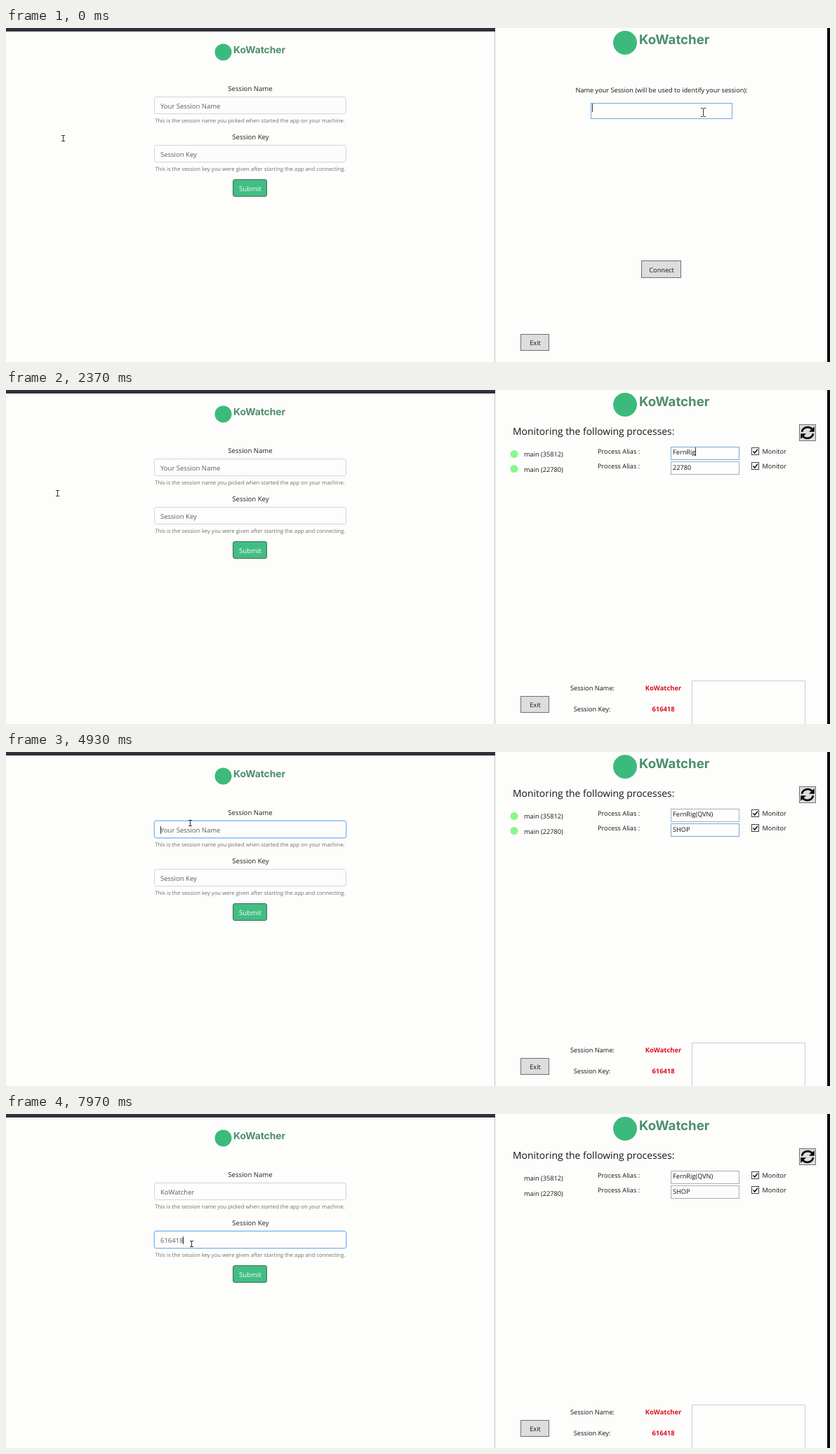
Recreate the animation shown at these times as an HTML page. Size 1174 by 477 pixels, loop 8000 ms.

```html
<!DOCTYPE html>
<html lang="en">
<head>
<meta charset="utf-8">
<title>Process monitor</title>
<style>
  html, body { margin: 0; width: 100%; height: 100%; overflow: hidden; background: #fdfdfb; }
  svg { display: block; width: 1174px; height: 477px; }
  text { font-family: "Open Sans", "Noto Sans", sans-serif; fill: #141414; white-space: pre; text-rendering: geometricPrecision; }
  .mid { text-anchor: middle; }
  .web text { font-size: 9.6px; fill: #222; }
  .web .hint { font-size: 7.7px; fill: #6c7268; }
  .web .value { font-size: 9.5px; fill: #5c5c5c; }
  .app text { font-size: 9.2px; }
  .app .title { font-size: 13.9px; }
  .app .red { font-size: 9.4px; font-weight: 700; fill: #dc1020; }
  .brand text { font-family: Inter, "Open Sans", sans-serif; font-weight: 700; fill: #4c8e6c; }
  .brand circle { fill: #3cba7c; }
  .field { fill: #fdfdfb; stroke: #d2d3e0; }
  .box { fill: #fdfdfb; stroke: #abadb3; }
  .button { fill: #ddd; stroke: #707070; }
  .ring { fill: none; stroke: #c4defb; stroke-width: 2; }
  .focus.field { stroke: #84baf5; }
  .focus.box { stroke: #74a9e0; }
  .hover { fill: #bee6fd; stroke: #3c7fb1; }
  .caret { stroke: #333; stroke-width: 1; }
  .beam { fill: none; stroke: #333; stroke-width: 1; }
</style>
</head>
<body>
<svg viewBox="0 0 1174 477">
  <rect width="1174" height="477" fill="#fdfdfb"/>
  <rect width="697" height="5" fill="#33303a"/>
  <rect x="696" y="5" width="1" height="472" fill="#c2c2ca"/>
  <rect x="1170" width="4" height="477" fill="#0b0b0d"/>

  <g class="brand">
    <circle cx="309.5" cy="34.5" r="12"/>
    <text x="324" y="35.5" font-size="13.8">KoWatcher</text>
    <circle cx="882" cy="21" r="17"/>
    <text x="902" y="22.5" font-size="18.7">KoWatcher</text>
  </g>

  <g class="web">
    <text class="mid" x="348" y="89.5">Session Name</text>
    <rect id="nameRing" class="ring" x="211" y="98" width="274" height="25" rx="3.5"/>
    <rect id="nameBox" class="field" x="211.5" y="98.5" width="273" height="24" rx="3"/>
    <text id="name" class="value" x="220" y="114.5"></text>
    <text class="hint mid" x="347.5" y="134.5">This is the session name you picked when started the app on your machine.</text>
    <text class="mid" x="348.5" y="159">Session Key</text>
    <rect id="keyRing" class="ring" x="211" y="167" width="274" height="25" rx="3.5"/>
    <rect id="keyBox" class="field" x="211.5" y="167.5" width="273" height="24" rx="3"/>
    <text id="key" class="value" x="220" y="183.5"></text>
    <text class="hint mid" x="348" y="203.8">This is the session key you were given after starting the app and connecting.</text>
    <rect x="323.5" y="216.5" width="48" height="24" rx="2.5" fill="#43bd83" stroke="#3f6e58"/>
    <text class="mid" x="348" y="232.5" style="fill:#f4fff8">Submit</text>
  </g>

  <g class="app">
    <rect class="button" x="733.5" y="437.5" width="40" height="23"/>
    <text class="mid" x="754" y="452.5">Exit</text>

    <g id="login">
      <text class="mid" x="934" y="91.5">Name your Session (will be used to identify your session):</text>
      <rect class="box focus" x="833.5" y="107.5" width="201" height="22"/>
      <text id="session" x="835.5" y="117.5"></text>
      <rect id="connect" class="button" x="905.5" y="332.5" width="56" height="24"/>
      <text class="mid" x="934" y="348.5">Connect</text>
    </g>

    <g id="monitor">
      <text class="title" x="722" y="64">Monitoring the following processes:</text>
      <rect class="button" x="1130.5" y="49.5" width="23" height="23"/>
      <g fill="none" stroke="#0c0c0c" stroke-width="2.8">
        <path d="M1134 59.8A8.4 8 0 0 1 1148.8 56.2M1150 62.2A8.4 8 0 0 1 1135.2 65.8"/>
        <path fill="#0c0c0c" stroke="none" d="M1151.8 52V59.8H1144ZM1132.2 70V62.2H1140Z"/>
      </g>
      <g id="dots" fill="#8df58b"><circle cx="724" cy="91.5" r="5.5"/><circle cx="724" cy="112.5" r="5.5"/></g>
      <text x="738" y="95.3">main (35812)</text>
      <text x="738" y="116.5">main (22780)</text>
      <text x="843" y="91.2">Process Alias :</text>
      <text x="843" y="112.2">Process Alias :</text>
      <rect id="firstBox" class="box" x="947.5" y="81.5" width="97" height="18"/>
      <rect id="secondBox" class="box" x="947.5" y="102.5" width="97" height="18"/>
      <text id="first" x="950" y="92.3"></text>
      <text id="second" x="950" y="113.5"></text>
      <g fill="#fff" stroke="#444">
        <rect x="1062.5" y="82.5" width="10" height="10"/>
        <rect x="1062.5" y="103.5" width="10" height="10"/>
        <path d="M1064.5 87.5l2.3 2.5 4-5.2M1064.5 108.5l2.3 2.5 4-5.2" fill="none" stroke="#111" stroke-width="1.5"/>
      </g>
      <text x="1077.5" y="91">Monitor</text>
      <text x="1077.5" y="112">Monitor</text>
      <text class="mid" x="835.5" y="429">Session Name:</text>
      <text class="mid" x="835" y="459">Session Key:</text>
      <text class="mid red" x="936.5" y="429">KoWatcher</text>
      <text class="mid red" x="936.5" y="459">616418</text>
      <rect x="977.5" y="415.5" width="161" height="70" fill="none" stroke="#cccdda"/>
    </g>
  </g>

  <line id="webCaret" class="caret"/>
  <line id="appCaret" class="caret"/>
  <g id="webMouse">
    <path class="beam" d="M-2.5 -4H2.5M-2.5 4H2.5M0 -4V4"/>
    <path class="arrow" d="M0 0V11L2.6 8.7 4.4 12.4 6 11.6 4.3 8H7.5Z" fill="#fff" stroke="#333" stroke-width=".9"/>
  </g>
  <g id="appMouse">
    <path class="beam" d="M-3.5 -6H-1L0 -5.2 1 -6H3.5M-3.5 6H-1L0 5.2 1 6H3.5M0 -5.5V5.5"/>
    <path class="arrow" d="M0 0V13L3 10.3 5.2 14.8 7 14 5 9.6H9Z" fill="#fff" stroke="#222"/>
  </g>
</svg>
<script>
const LOOP = 8000, SWITCH = 1200;
const ui = {};
document.querySelectorAll('[id]').forEach(el => ui[el.id] = el);

// Cursor waypoints: time, x, y
const webPath = [
  [0, 81, 157], [500, 81, 157], [1300, 87, 130], [1700, 87, 130], [2500, 73, 149], [3450, 73, 149],
  [4150, 228, 112], [4700, 262, 101], [5800, 262, 101], [6070, 247, 155], [6200, 247, 157], [6650, 264, 185]
];
const appPath = [
  [0, 993, 120], [700, 993, 120], [1020, 942, 344], [1200, 942, 344], [1450, 1001, 86],
  [1520, 1001, 86], [1620, 990, 90], [2850, 990, 90], [3050, 982, 111]
];

// Key presses: field, first, last, text before, text after; text is removed or extended
const strokes = [
  ['session', 120, 680, '', 'KoWatcher'],
  ['first', 1740, 1900, '35812', ''], ['first', 1960, 2700, '', 'FernRig(QVN)'],
  ['second', 3300, 3460, '22780', ''], ['second', 3580, 3950, '', 'SHOP'],
  ['name', 5060, 5750, '', 'KoWatcher'], ['key', 7150, 7860, '', '616418']
];
// Caret: field, focused from, until
const focus = [
  ['session', 0, SWITCH], ['first', 1640, 3100], ['second', 3100, 5000],
  ['name', 4800, 6650], ['key', 6650, LOOP]
];
const hints = { name: 'Your Session Name', key: 'Session Key' };

function along(path, t) {
  const i = path.findIndex(p => p[0] > t);
  if (i < 0) return path[path.length - 1].slice(1);
  const [t0, x0, y0] = path[i - 1], [t1, x1, y1] = path[i];
  const u = (t - t0) / (t1 - t0), e = u * u * (3 - 2 * u);
  return [x0 + (x1 - x0) * e, y0 + (y1 - y0) * e];
}

// Text of a field and the time of its latest key press
function typed(field, t) {
  const rows = strokes.filter(s => s[0] === field);
  let text = rows[0][3], last = -1;
  for (const [, start, end, before, after] of rows) {
    if (t < start) break;
    const n = Math.max(before.length, after.length), gap = (end - start) / (n - 1);
    const k = Math.min(n, Math.floor((t - start) / gap + 1e-6) + 1);
    text = after ? after.slice(0, k) : before.slice(0, n - k);
    last = start + (k - 1) * gap;
  }
  return { text, last };
}

const show = (el, on) => el.setAttribute('visibility', on ? 'inherit' : 'hidden');
// Centre of the pixel, so that thin lines stay sharp
const snap = v => Math.floor(v) + .5;

function mouse(el, [x, y], arrow) {
  el.setAttribute('transform', `translate(${snap(x)} ${snap(y)})`);
  show(el.querySelector('.beam'), !arrow);
  show(el.querySelector('.arrow'), arrow);
}

function caret(el, fields, t, height) {
  const row = focus.find(([f, a, b]) => fields.includes(f) && t >= a && t < b);
  if (!row) return show(el, false);
  const [field, since] = row, { text, last } = typed(field, t);
  const node = ui[field];
  const x = snap(+node.getAttribute('x') + (text ? node.getComputedTextLength() : 0));
  const y = Math.round(+node.getAttribute('y') + 2);
  for (const [k, v] of Object.entries({ x1: x, x2: x, y1: y - height, y2: y })) el.setAttribute(k, v);
  show(el, (t - Math.max(since, last)) % 360 < 180);
}

function render(t) {
  const open = t >= SWITCH;
  show(ui.login, !open);
  show(ui.monitor, open);
  show(ui.dots, open && (t + 680) % 690 < 345);

  for (const field of ['session', 'first', 'second', 'name', 'key']) {
    const { text } = typed(field, t), node = ui[field];
    node.textContent = text || hints[field] || '';
    const active = focus.some(([f, a, b]) => f === field && t >= a && t < b + (f === 'first' ? 130 : 0));
    if (ui[field + 'Box']) ui[field + 'Box'].classList.toggle('focus', active);
    if (ui[field + 'Ring']) show(ui[field + 'Ring'], active);
  }
  caret(ui.webCaret, ['name', 'key'], t, 11);
  caret(ui.appCaret, ['session', 'first', 'second'], t, 12);

  const web = along(webPath, t), app = along(appPath, t);
  mouse(ui.webMouse, web, t > 5800 && web[1] > 124 && web[1] < 167);
  mouse(ui.appMouse, app, app[1] > 131);
  const hidden = [[120, 700], [1740, 2850], [3300, LOOP]].some(([a, b]) => t >= a && t < b);
  ui.appMouse.style.display = hidden ? 'none' : '';
  ui.connect.classList.toggle('hover', app[1] > 333 && app[1] < 357);
}

const start = performance.now();
function tick() {
  render((performance.now() - start) % LOOP);
  requestAnimationFrame(tick);
}
tick();
</script>
</body>
</html>
```
